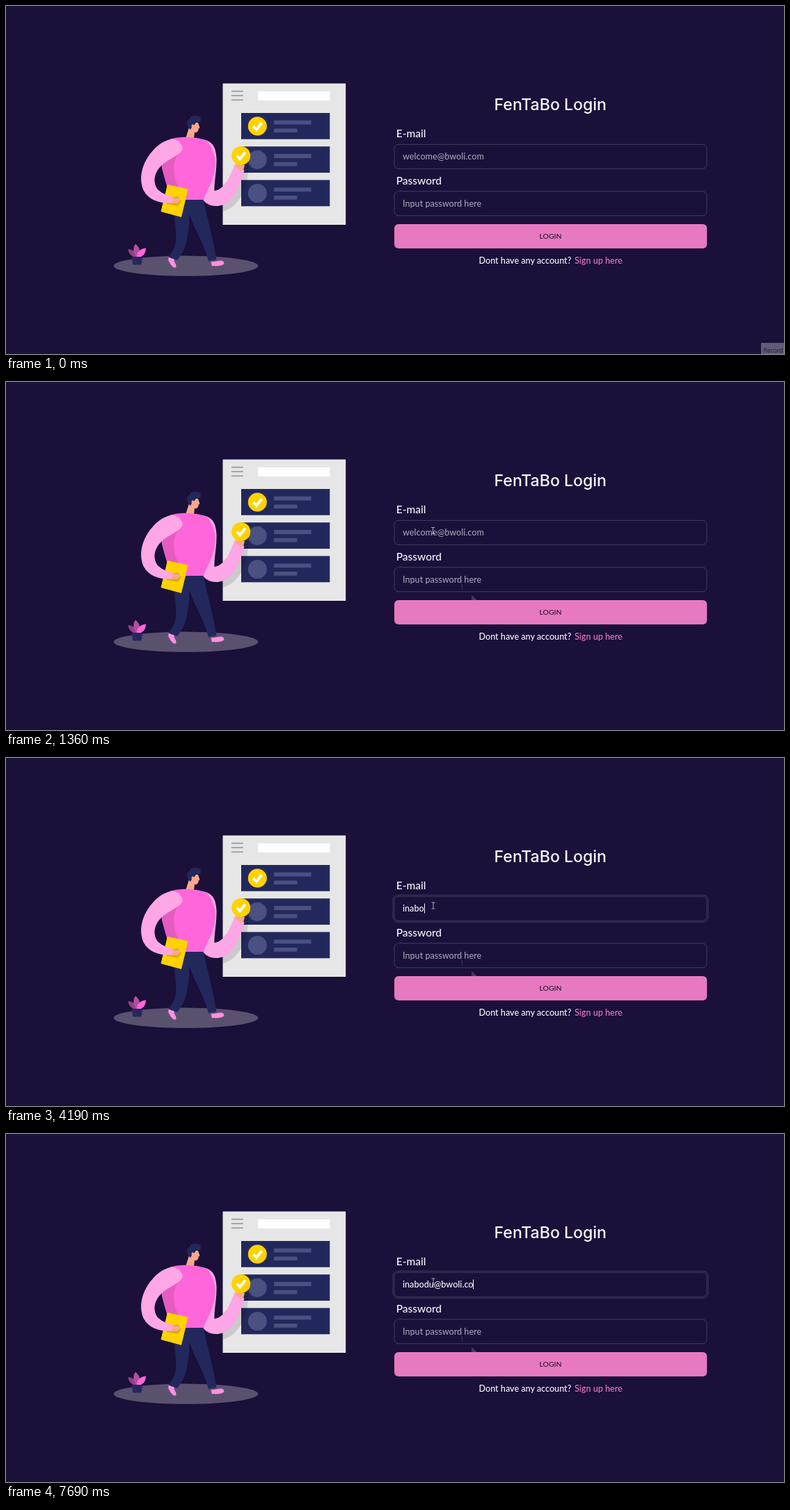
Animation, 1118 px wide and 501 px high, one loop 8000 ms. Source, as an HTML page:

```html
<!DOCTYPE html>
<html lang="en">
<head>
<meta charset="utf-8">
<title>Login</title>
<style>
  html, body { margin: 0; width: 100%; height: 100%; overflow: hidden; background: #1a103a; }
  svg { display: block; width: 1118px; height: 501px; }
  text { font: 500 12.6px Lato, sans-serif; fill: #f9f7fd; white-space: pre; }
  .title { font: 500 23.1px Inter, sans-serif; text-anchor: middle; }
  .label { font-size: 15.5px; }
  .hint { fill: #a49fb2; }
  .box { fill: none; stroke: #f9f7fd; stroke-opacity: .19; }
  .navy { fill: #23285c; }
  .dim { fill: #4b5080; }
  .gold { fill: #ffd200; }
  .skin { fill: #f9a78c; }
  .pink { fill: #ff66d9; }
  .pale { fill: #ffa6e6; }
  .shade { fill: #e65bc3; }
  .shoe { fill: #ff8fe0; }
  .tick { fill: none; stroke: #fff; stroke-width: 3.8; }
</style>
</head>
<body>
<svg viewBox="0 0 1118 501">
  <rect width="1118" height="501" fill="#1a103a"/>

  <!-- task board -->
  <path fill="#e6e6e6" d="M311.5 111.5H488.2V315H311.5Z"/>
  <path stroke="#a5a3ae" stroke-width="2" d="M324 122.7h16.7M324 129h16.7M324 135.2h16.7"/>
  <path fill="#fff" d="M362 123h103.5v13H362Z"/>
  <defs>
    <g id="card">
      <path class="navy" d="M338 154h127.3v37.7H338Z"/>
      <circle class="dim" cx="361.3" cy="173" r="13.5"/>
      <path class="dim" d="M385 164.8h53.5v5.8H385ZM385 176.5h33.5v5.6H385Z"/>
    </g>
    <g id="done">
      <circle class="gold" r="13.5"/>
      <path class="tick" d="M-6 .3L-1.5 4.8L6.3-4.8"/>
    </g>
  </defs>
  <use href="#card"/>
  <use href="#card" y="48.3"/>
  <use href="#card" y="96.6"/>
  <use href="#done" x="361.3" y="173"/>
  <path fill="#000" opacity=".12" d="M311.5 258C322 250 328 240 332 228H348C349 258 337 289 311.5 296Z"/>

  <!-- ground and plant -->
  <ellipse cx="258.5" cy="374.2" rx="103.7" ry="14.6" fill="#5a516f"/>
  <path fill="#8f4385" d="M187 362C180 361 176 356 175.5 350C182 350 187 355 188 361Z"/>
  <path fill="#b54d9f" d="M188 362C182 355 182 348 186 342.5C193 348 194 355 190 362Z"/>
  <path class="pink" d="M188 362C188 354 193 349 201 348.5C201 356 197 361 190 362Z"/>
  <path class="navy" d="M180.5 361H196.5L194.5 372.5H182.5Z"/>

  <!-- person -->
  <path class="shoe" d="M234 361.5L241.5 364C241 369 245 371 244.5 376C241 378 238 374 236 371C234 368 232 365 234 361.5Z"/>
  <path class="shoe" d="M294.5 368C300 369 304 366 309 366.5C313 367 314.5 370 312.5 372C307 375 301 374 296 374.3Z"/>
  <path class="navy" d="M241 277H284C287 300 296 325 302.5 365L291 367.5C286 345 271 322 263.5 300C263 322 261 350 246 366L233.5 361.5C244 349 245 337 244 325C243 308 240 296 241 277Z"/>
  <path class="skin" d="M264 172L258 191C262 194 268 194 270 190L271 182C275 182.5 276.5 180 276.5 177L278.5 175L276 168L266 165Z"/>
  <path class="navy" d="M262 175C259 171 259.5 164 264 162.5C265 157 275 156.5 279.5 160C281 165 278 168.5 273 168L270.5 171.5C268 169 265.5 171 267 174.5L265 178Z"/>
  <path class="pale" d="M282 192C297 194 302 204 302.5 220C303 236 299 252 299.5 266C314 264 322 246 328 228.5L342.5 236.5C335 262 326 286 304 288C291 288.5 284 282 282.5 277Z"/>
  <path class="pink" d="M236 191.5C252 187 275 188 288 194C300 204 303 225 299 241C296 255 288 266 284 279H236C234 262 222 236 222 214Z"/>
  <path class="shade" d="M222 214L252 206C238 222 239 242 246 257C248 268 250 273 250 279H236C234 262 222 236 222 214Z"/>
  <path class="gold" d="M232 257L261.7 263.5L252 304L222.5 296Z"/>
  <path fill="#dfae08" d="M231 277L247 274L252 281L247 288L230 285Z"/>
  <path class="pale" d="M236 192C247 190 255 200 253.5 207C248 216 231 221 222 231C212 242 211 255 218 264C224 270 232 273 240 275L239 283.5C222 284.5 206 280 198.5 267C191 253 193.5 234 203.5 218C212 205 223 195 236 192Z"/>
  <path class="skin" d="M239 275.5C244 277 249 275 250.5 279C250 283 245 284.5 238 283.5Z"/>
  <path class="skin" d="M329.5 226L343 229L341 237L330 233Z"/>
  <use href="#done" x="337.7" y="215.4"/>

  <!-- form -->
  <text class="title" x="782.3" y="149.7">FenTaBo Login</text>
  <text class="label" x="560.7" y="189">E-mail</text>
  <rect class="box" x="558" y="199.3" width="449" height="35" rx="6"/>
  <rect class="box" id="ring" x="556" y="197.3" width="453" height="39" rx="7.5"/>
  <text class="hint" id="hint" x="570" y="221">welcome@bwoli.com</text>
  <text id="mail" x="570" y="221"></text>
  <path id="caret" d="M.5 209.5V223.5" stroke="#f9f7fd"/>
  <text class="label" x="560.7" y="256.7">Password</text>
  <rect class="box" x="558" y="266.8" width="449" height="35" rx="6"/>
  <text class="hint" x="570" y="289">Input password here</text>
  <rect id="button" x="558" y="314" width="449.3" height="35" rx="6"/>
  <text x="782.5" y="335.2" text-anchor="middle" style="font-size:10.4px;fill:#271325">LOGIN</text>
  <text x="679.5" y="371">Dont have any account?</text>
  <text x="817" y="371" style="fill:#e779c1">Sign up here</text>

  <!-- pointer and the trails it leaves -->
  <path id="trailArrow" fill="#4d3158" d="M669 306.5V314H677Z"/>
  <path id="trailBeam" stroke="#3b3356" d="M655.5 291V299.5"/>
  <path id="arrow" fill="#fff" stroke="#221a33" stroke-width=".6" d="M0 0V10L2.3 8L3.9 11.7L5.5 11L3.9 7.5H7Z"/>
  <path id="beam" fill="none" stroke="#aaa5b8" d="M-2.5-4.5H2.5M0-4.5V4.5M-2.5 4.5H2.5"/>

  <g id="tip">
    <rect x="1085" y="485" width="33" height="16" fill="#625b78"/>
    <text x="1088.5" y="498.5" style="font:8.6px 'Open Sans',sans-serif;fill:#1d1536">Record</text>
  </g>
</svg>
<script>
const LOOP = 8000;
const address = "inabodu@bwoli.co";
const keys = [2620, 2820, 3120, 3790, 4190, 4460, 4610, 5730,
              6270, 6620, 6820, 6880, 7080, 7280, 7550, 7690];
const focusAt = 1430;
// times at which the caret turns on, off, on ...
const blinks = [1490, 1950, 2480, 3660, 3790, 5140, 5660];
// time, x, y
const moves = [
  [460, 1034, 489], [530, 985, 462], [600, 900, 420], [660, 790, 368],
  [710, 705, 330], [760, 669, 307], [830, 655, 294], [900, 648, 280],
  [970, 640, 262], [1050, 631, 243], [1130, 622, 228], [1220, 616, 219],
  [1360, 613.5, 214], [1880, 614, 212.5]
];
const beamFrom = 830;
const rest = [231, 121, 193], hover = [227, 98, 183];

const el = id => document.getElementById(id);
const show = (id, on) => el(id).setAttribute("visibility", on ? "visible" : "hidden");
const passed = (list, t) => list.filter(at => at <= t).length;
const ramp = (t, from, to) => Math.min(1, Math.max(0, (t - from) / (to - from)));

function drawPointer(t) {
  const [, x, y] = moves[passed(moves.map(m => m[0]), t) - 1] || [0, -50, -50];
  const id = t < beamFrom ? "arrow" : "beam";
  show("arrow", id === "arrow");
  show("beam", id === "beam");
  el(id).setAttribute("transform", `translate(${x} ${y})`);
  show("trailArrow", t >= 830);
  show("trailBeam", t >= 900);
}

function drawField(t) {
  const mail = el("mail");
  const typed = address.slice(0, passed(keys, t));
  if (mail.textContent !== typed) mail.textContent = typed;
  show("hint", !typed);
  show("ring", t >= focusAt);
  show("caret", passed(blinks, t) % 2 === 1);
  const end = typed ? mail.getComputedTextLength() : 0;
  el("caret").setAttribute("transform", `translate(${Math.round(570 + end)} 0)`);
}

function draw(t) {
  const mix = ramp(t, 640, 750) - ramp(t, 790, 960);
  const color = rest.map((c, i) => Math.round(c + (hover[i] - c) * mix));
  el("button").setAttribute("fill", `rgb(${color})`);
  show("tip", t < 70);
  drawPointer(t);
  drawField(t);
}

const start = performance.now();
function tick() {
  draw((performance.now() - start) % LOOP);
  requestAnimationFrame(tick);
}
tick();
</script>
</body>
</html>
```
